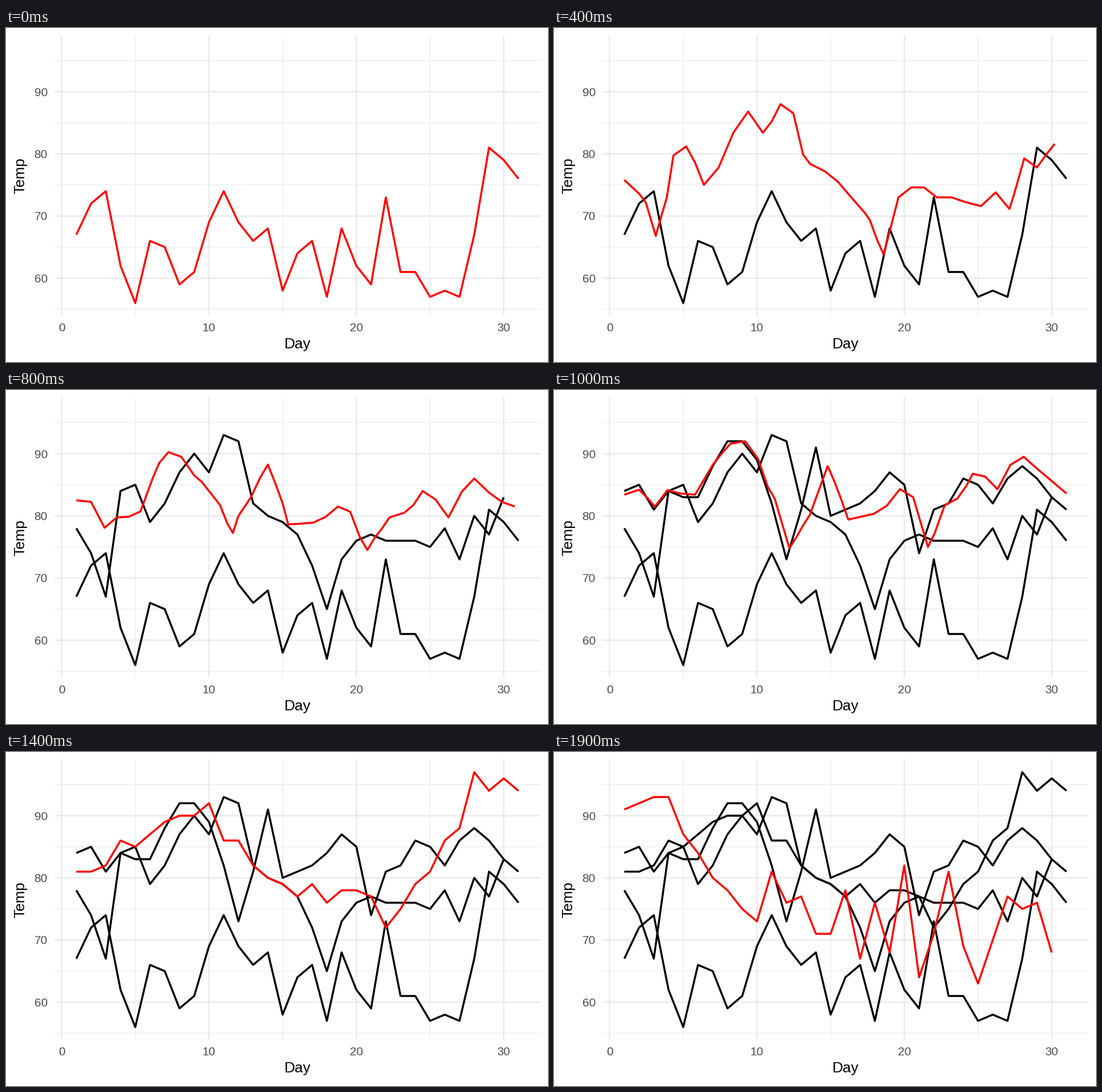
A matplotlib script that plays this animation: 952 px wide and 588 px high, repeating every 2 s.

```python
import numpy as np
import matplotlib.pyplot as plt
from matplotlib.animation import FuncAnimation

W, H, DPI = 952, 588, 64
PT = 72 / DPI                                   # points per pixel
LEFT, RIGHT, TOP, BOTTOM = 84.66, 938.95, 13.05, 506.7
XLIM, YLIM = (-0.5, 32.5), (53.95, 99.05)
VERTS = 50                                      # vertices of a morphing path

# Daily temperatures of the airquality data set
may = [67, 72, 74, 62, 56, 66, 65, 59, 61, 69, 74, 69, 66, 68, 58, 64,
       66, 57, 68, 62, 59, 73, 61, 61, 57, 58, 57, 67, 81, 79, 76]
june = [78, 74, 67, 84, 85, 79, 82, 87, 90, 87, 93, 92, 82, 80, 79,
        77, 72, 65, 73, 76, 77, 76, 76, 76, 75, 78, 73, 80, 77, 83]
july = [84, 85, 81, 84, 83, 83, 88, 92, 92, 89, 82, 73, 81, 91, 80, 81,
        82, 84, 87, 85, 74, 81, 82, 86, 85, 82, 86, 88, 86, 83, 81]
august = [81, 81, 82, 86, 85, 87, 89, 90, 90, 92, 86, 86, 82, 80, 79, 77,
          79, 76, 78, 78, 77, 72, 75, 79, 81, 86, 88, 97, 94, 96, 94]
september = [91, 92, 93, 93, 87, 84, 80, 78, 75, 73, 81, 76, 77, 71, 71,
             78, 67, 76, 68, 82, 64, 71, 81, 69, 63, 70, 77, 75, 76, 68]

months = [may, june, july, august, september]
LONG_EDGES = [11, 12, 12, 10, 14]               # edges that get extra vertices
STARTS = [0, 5, 9, 14, 19]                      # frame at which each month is reached


def refine(temps, n_long):
    """Split the longest edges evenly until the path has VERTS vertices."""
    y = np.array(temps, float)
    x = np.arange(1, len(y) + 1)
    size = np.hypot(1, np.diff(y))
    longest = np.argsort(-size, kind="stable")[:n_long]
    extra = np.zeros(len(size), int)
    share = (VERTS - len(y)) / size[longest].sum()
    extra[longest] = np.round(size[longest] * share)
    parts = [x0 + np.arange(k + 1) / (k + 1) for x0, k in zip(x, extra)]
    xs = np.append(np.concatenate(parts), x[-1])
    return np.column_stack([xs, np.interp(xs, x, y)])


paths = [refine(m, k) for m, k in zip(months, LONG_EDGES)]

plt.rcParams["font.family"] = "Liberation Sans"
fig = plt.figure(figsize=(W / DPI, H / DPI), dpi=DPI, facecolor="white")
ax = fig.add_axes([LEFT / W, 1 - BOTTOM / H, (RIGHT - LEFT) / W, (BOTTOM - TOP) / H])
ax.set_xlim(*XLIM)
ax.set_ylim(*YLIM)
ax.axis("off")


def px(day):
    return LEFT + (day - XLIM[0]) / (XLIM[1] - XLIM[0]) * (RIGHT - LEFT)


def py(temp):
    return BOTTOM - (temp - YLIM[0]) / (YLIM[1] - YLIM[0]) * (BOTTOM - TOP)


def label(x, y, s, size, color, ha="center", rotation=0):
    fig.text(x / W, 1 - y / H, s, fontsize=size * PT, color=color, ha=ha,
             va="baseline", rotation=rotation, rotation_mode="anchor")


def grid(days, temps, width):
    style = dict(color="#EBEBEB", lw=width * PT, solid_capstyle="butt",
                 snap=False, zorder=1)
    for t in temps:
        ax.axhline(t, **style)
    for d in days:
        ax.axvline(d, **style)


grid(range(5, 30, 10), range(55, 100, 10), 1.27)
grid(range(0, 40, 10), range(60, 100, 10), 2.53)

for d in range(0, 40, 10):
    label(px(d), 533.9, str(d), 20.86, "#4D4D4D")
for t in range(60, 100, 10):
    label(73, py(t) + 7.4, str(t), 20.86, "#4D4D4D", ha="right")
label((LEFT + RIGHT) / 2, 564, "Day", 26.07, "black")
label(32, (TOP + BOTTOM) / 2, "Temp", 26.07, "black", rotation=90)


def curve(path, color, z):
    return ax.plot(path[:, 0], path[:, 1], color=color, lw=3.5 * PT, zorder=z,
                   solid_capstyle="butt", solid_joinstyle="round")[0]


past = [curve(p, "black", 2) for p in paths[:-1]]
current = curve(paths[0], "red", 3)


def update(frame):
    i = min(np.searchsorted(STARTS, frame, side="right") - 1, len(paths) - 2)
    t = (frame - STARTS[i]) / (STARTS[i + 1] - STARTS[i])
    xy = (1 - t) * paths[i] + t * paths[i + 1]
    current.set_data(xy[:, 0], xy[:, 1])
    for line, start in zip(past, STARTS):
        line.set_visible(bool(start < frame))
    return [*past, current]


anim = FuncAnimation(fig, update, frames=20, interval=100,
                     init_func=lambda: update(0), repeat=True, repeat_delay=0)
plt.show()
```
